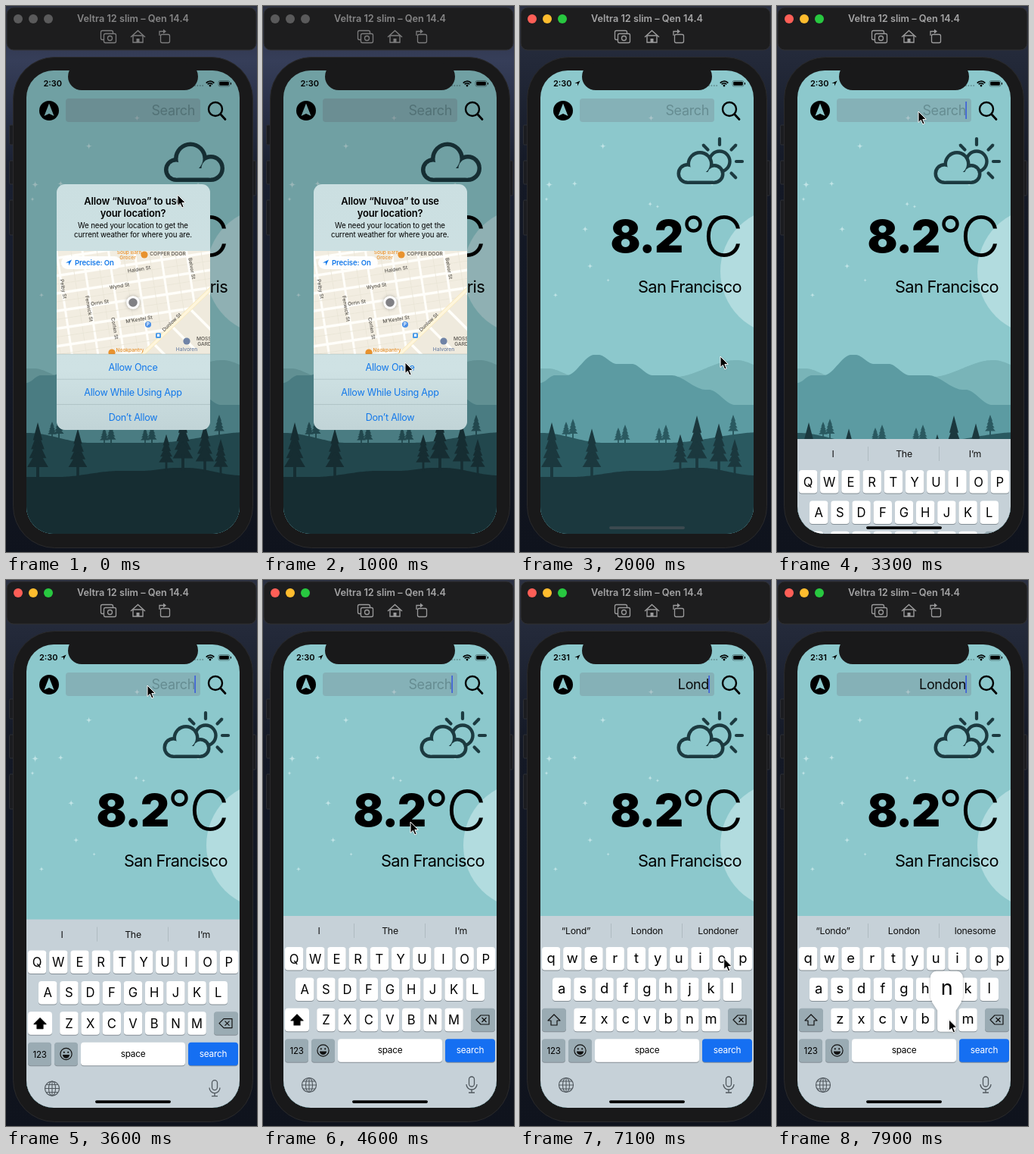
These frames come from a looping animation (332x720 px, 8 s). An HTML page with a canvas:

```html
<!DOCTYPE html>
<html lang="en">
<head>
<meta charset="utf-8">
<title>Weather app demo</title>
<style>
html, body { margin: 0; width: 100%; height: 100%; overflow: hidden; background: #151a28; }
canvas { display: block; width: 332px; height: 720px; }
</style>
</head>
<body>
<canvas id="stage"></canvas>
<script>
const W = 332, H = 720, LOOP = 8000, STEP = 100;
const canvas = document.getElementById('stage');
const scale = window.devicePixelRatio || 1;
canvas.width = W * scale;
canvas.height = H * scale;
const c = canvas.getContext('2d');

const SKY = '#8cc8cc', INK = '#1c3a40', BLUE = '#1278ea';
const BODY = '#19191a', BAR = '#1d1d1e', DARK_KEY = '#9aabb3';
const screen = { x: 27, y: 85, w: 282, h: 611 };

// ---------- helpers ----------
const ramp = (t, a, b) => Math.max(0, Math.min(1, (t - a) / (b - a)));
const mix = (a, b, k) => a + (b - a) * k;
const easeOut = k => 1 - (1 - k) ** 2;
const smooth = (x, a, b) => { const k = ramp(x, a, b); return k * k * (3 - 2 * k); };

function paint(fill, stroke, width = 1) {
  if (fill) { c.fillStyle = fill; c.fill(); }
  if (stroke) { c.strokeStyle = stroke; c.lineWidth = width; c.stroke(); }
}
function box(x, y, w, h, r, ...style) {
  c.beginPath();
  c.roundRect(x, y, w, h, r);
  paint(...style);
}
function disc(x, y, r, ...style) {
  c.beginPath();
  c.arc(x, y, r, 0, Math.PI * 2);
  paint(...style);
}
function arc(x, y, r, from, to, ...style) {
  c.beginPath();
  c.arc(x, y, r, from * Math.PI, to * Math.PI);
  paint(...style);
}
function poly(points, ...style) {
  c.beginPath();
  points.forEach(p => c.lineTo(...p));
  c.closePath();
  paint(...style);
}
function line(color, width, ...points) {
  c.beginPath();
  points.forEach(p => c.lineTo(...p));
  paint(null, color, width);
}
function text(str, x, y, size, { weight = 400, color = '#000', align = 'center', tight = 0.02 } = {}) {
  c.font = `${weight} ${size}px Inter, "Open Sans", sans-serif`;
  c.letterSpacing = -tight * size + 'px';
  c.textAlign = align;
  c.fillStyle = color;
  c.fillText(str, x, y);
}
function shadow(blur, paintShape) {
  c.save();
  c.shadowColor = 'rgba(0,0,0,.3)';
  c.shadowBlur = blur;
  paintShape();
  c.restore();
}
function arrowhead(x, y, s, fill) {
  poly([[x + s, y - s], [x, y + s], [x, y], [x - s, y]], fill);
}

// ---------- keys, typing and pointer ----------
const rows = ['qwertyuiop', 'asdfghjkl', 'zxcvbnm'];
const PITCH = 28.2, WORD = 'London', KEYBOARD_AT = 3300;
const keyX = (row, i) => 168 + (i - (rows[row].length - 1) / 2) * PITCH;
const keyY = row => 484 + row * 40.4;

const presses = [...WORD].map((letter, i) => {
  const low = letter.toLowerCase(), row = rows.findIndex(r => r.includes(low));
  return { letter, time: 4940 + 502 * i + 14 * i * i, x: keyX(row, rows[row].indexOf(low)), y: keyY(row) };
});
const pressedBy = t => presses.filter(p => t >= p.time).length;
const typedBy = t => WORD.slice(0, pressedBy(t - 100));

const stops = [
  { from: 0, to: 900, x: 188, y: 470 },
  { from: 1400, to: 2000, x: 265, y: 462 },
  { from: 2200, to: 3000, x: 187, y: 139 },
  { from: 4000, to: 4600, x: 195, y: 319 },
  ...presses.map((p, i) => ({
    from: i ? presses[i - 1].time + 60 : 4600, to: p.time - 110, x: p.x + 3, y: p.y + 15
  }))
];
function pointerAt(t) {
  return stops.reduce((at, s) => {
    const k = easeOut(ramp(t, s.from, s.to));
    return { x: mix(at.x, s.x, k), y: mix(at.y, s.y, k) };
  }, { x: 227, y: 249 });
}

// ---------- desktop and device ----------
function desktop(active) {
  const g = c.createLinearGradient(0, 0, 0, H);
  g.addColorStop(0, '#2b3042');
  g.addColorStop(0.1, active ? '#232939' : '#363e59');
  g.addColorStop(0.3, active ? '#141926' : '#1a2031');
  g.addColorStop(1, '#0f131d');
  c.fillStyle = g;
  c.fillRect(0, 0, W, H);
}
function toolbar(active) {
  box(1, 2, 330, 56, 9, BAR, '#303032');
  ['#fe5f57', '#febc2e', '#28c840'].forEach((color, i) => disc(16 + i * 20, 17, 6, active ? color : '#5a5a5b'));
  text('Veltra 12 slim – Qen 14.4', 168, 21, 12.7, { weight: 600, color: active ? '#a5a5a6' : '#858586', tight: 0 });

  const grey = active ? '#9b9b9c' : '#7c7c7d';
  box(125.5, 32.5, 16, 12, 2, null, grey, 1.3);
  box(129.5, 36.5, 16, 12, 2, BAR, grey, 1.3);
  disc(137.5, 42.5, 3, null, grey, 1.3);
  line(grey, 1.4, [165, 41], [174.5, 32.5], [184, 41]);
  box(168, 39, 13, 9, 0, null, grey, 1.4);
  box(172.5, 43, 4, 5, 0, grey);
  box(204.5, 37.5, 12, 11, 2, null, grey, 1.3);
  line(grey, 1.3, [203, 39], [203, 33.5], [210, 33.5]);
  poly([[208, 30.5], [212, 33.5], [208, 36.5]], grey);
}
function device() {
  const side = (x, y, h) => box(x, y, 6, h, 1.5, '#1b1c20', '#2d2f35');
  side(4.5, 157, 26);
  side(4.5, 204, 31);
  side(4.5, 256, 46);
  side(324.5, 204, 46);
  box(9.5, 67.5, 317, 647, 55, BODY, '#2a2a2c');
}

// ---------- landscape ----------
function ridge(height, color) {
  c.beginPath();
  c.moveTo(screen.x, H);
  for (let x = screen.x; x <= screen.x + screen.w; x += 2) c.lineTo(x, height(x));
  c.lineTo(screen.x + screen.w, H);
  paint(color);
}
const farHills = x => 478 + 11 * smooth(x, 38, 75) - 22 * smooth(x, 205, 285) + 10 * smooth(x, 288, 325);
const mountain = x => 497 - 10 * smooth(x, 27, 46) - 27 * smooth(x, 62, 98) + 12 * smooth(x, 104, 128)
  + 15 * smooth(x, 148, 175) + 19 * smooth(x, 200, 246) + 20 * smooth(x, 250, 284);
const meadow = x => 563 + 13 * smooth(x, 30, 110) - 14 * smooth(x, 195, 320);
const ground = x => 621 - 8 * smooth(x, 70, 150) - 4 * smooth(x, 180, 225) + 10 * smooth(x, 240, 310);

function tree(x, height, base, color) {
  const w = 6 + height * 0.31, crown = height * 0.82;
  for (let i = 0; i < 4; i++) {
    const y = base - height + crown * i * 0.2, half = w * (0.22 + 0.09 * i);
    poly([[x, y], [x + half, y + crown * 0.4], [x - half, y + crown * 0.4]], color);
  }
  c.fillRect(x - w * 0.07, base - height * 0.25, w * 0.14, height * 0.25 + 4);
}
function stars() {
  let seed = 11;
  const random = () => (seed = seed * 16807 % 2147483647) / 2147483647;
  for (let i = 0; i < 12; i++) {
    const x = mix(35, 300, random()), y = mix(118, 424, random()), r = mix(2, 5.5, random());
    c.beginPath();
    c.moveTo(x, y - r);
    [[r, 0], [0, r], [-r, 0], [0, -r]].forEach(([dx, dy]) => c.quadraticCurveTo(x, y, x + dx, y + dy));
    paint('#bfe3e5');
  }
}
function landscape() {
  c.fillStyle = SKY;
  c.fillRect(screen.x, screen.y, screen.w, screen.h);
  disc(349, 350, 84, '#b2dcdf');
  stars();
  ridge(farHills, '#79b4b8');
  ridge(mountain, '#5c9ba2');

  const mid = '#2a5960', near = '#1b383e';
  ridge(meadow, mid);
  for (const x of [65, 134, 188]) {
    tree(x - 4, 20, meadow(x), mid);
    tree(x + 5, 24, meadow(x), mid);
  }
  tree(282, 26, meadow(282), mid);
  ridge(ground, near);
  const groves = { 42: 72, 95: 62, 212: 45, 234: 69, 263: 61, 284: 45 };
  for (const x in groves) tree(+x, groves[x], ground(+x), near);
}

// ---------- weather screen ----------
function cloud(lobes, bottom, width) {
  const left = lobes[0], right = lobes[2];
  for (const [inset, color] of [[0, INK], [width, SKY]]) {
    lobes.forEach(([x, y, r]) => disc(x, y, r - inset, color));
    c.fillRect(left[0], left[1] - 2, right[0] - left[0], bottom - inset - left[1] + 2);
  }
}
function sunnyCloud() {
  c.lineCap = 'round';
  for (let i = -3; i <= 1; i++) {
    const dx = Math.cos(i * Math.PI / 4), dy = Math.sin(i * Math.PI / 4);
    line(INK, 4.2, [264 + dx * 22, 205 + dy * 22], [264 + dx * 30, 205 + dy * 30]);
  }
  c.lineCap = 'butt';
  disc(264, 205, 13.5, null, INK, 4.4);
  cloud([[221.5, 221, 14], [238, 208.5, 17.5], [257, 221.5, 13.5]], 235, 4.5);
}
function statusBar(t) {
  const located = t >= 1300;
  text(t >= 7000 ? '2:31' : '2:30', located ? 44 : 49.5, 106, 11, { weight: 600, align: 'left', tight: 0 });
  if (located) arrowhead(76, 102, 3.6, '#000');
  for (let i = 0; i < 4; i++) disc(250 + i * 3.4, 105, 1, 'rgba(0,0,0,.28)');
  for (const r of [4.1, 6.8]) arc(270, 106, r, 1.22, 1.78, null, '#000', 1.7);
  disc(270, 105, 1.4, '#000');
  box(281, 98.5, 15, 7.5, 2.2, null, 'rgba(0,0,0,.45)', 0.8);
  box(282.2, 99.7, 12.6, 5.1, 1.2, '#000');
  c.fillRect(297, 101, 1, 2.6);
}
function searchRow(t) {
  disc(57, 138, 13, '#000');
  poly([[57, 128.5], [63.5, 145], [57, 142], [50.5, 145]], SKY);
  box(79, 122, 178, 31, 4, 'rgba(116,116,128,.28)');
  const word = typedBy(t);
  text(word || 'Search', 250, 144, 18, { align: 'right', color: word ? '#0a0c0c' : '#668d92' });
  const lastEdit = word ? presses[word.length - 1].time : KEYBOARD_AT;
  if (t >= KEYBOARD_AT && (t - lastEdit) % 1000 < 600) box(249.3, 126, 1.7, 23, 0, '#3f62d8');
  disc(277, 136, 9, null, '#000', 2.4);
  c.lineCap = 'round';
  line('#000', 2.8, [283.8, 142.8], [290, 149.5]);
  c.lineCap = 'butt';
}
function weather(t) {
  const updated = t >= 1600;
  if (updated) sunnyCloud();
  else cloud([[225, 216, 16], [244, 201.5, 22], [271, 214, 18]], 232, 5.5);
  text(updated ? '8.2' : '9.4', 215, 325, 59, { weight: 900, align: 'right' });
  disc(229.5, 287.5, 9, null, '#000', 4.4);
  text('C', 294, 330, 73, { weight: 300, align: 'right' });
  text(updated ? 'San Francisco' : 'Paris', 293, 377.5, 21.8, { align: 'right', tight: 0.03 });
}

// ---------- permission dialog ----------
function label(str, x, y, degrees = 0, color = '#55524c') {
  c.save();
  c.translate(x, y);
  c.rotate(degrees * Math.PI / 180);
  text(str, 0, 2.4, 6.6, { weight: 500, color, tight: 0 });
  c.restore();
}
function place(name, x, y, color) {
  disc(x, y, 4.6, color);
  label(name, x, y + 11, 0, color);
}
function streets() {
  c.save();
  c.translate(168, 391);
  c.rotate(-0.15);
  for (let i = -5; i <= 5; i++) {
    line('#e9e4d5', 0.7, [-140, i * 23 + 7], [140, i * 23 + 7]);
    line('#fffefa', 3.4, [-140, i * 23 - 4], [140, i * 23 - 4]);
    line('#fffefa', 3, [i * 34 + 12, -110], [i * 34 + 12, 110]);
    line('#e9e4d5', 0.7, [i * 34 - 3, -110], [i * 34 - 3, 110]);
  }
  c.restore();
  poly([[181, 460], [271, 373], [271, 460]], '#efeadd');
  for (let i = 0; i < 4; i++) line('#fffefa', 3.4, [195 + i * 24, 445 - i * 23], [225 + i * 24, 475 - i * 23]);
  line('#f7e9bf', 5, [176, 464], [274, 370]);
  line('#fff6dc', 3.4, [176, 464], [274, 370]);
}
function cityMap() {
  c.save();
  c.beginPath();
  c.rect(67, 323, 203, 136);
  c.clip();
  c.fillStyle = '#f2ede1';
  c.fillRect(67, 323, 203, 136);
  streets();
  ['Halden St', 'Wynd St', 'Orrin St', 'M’Kestel St'].forEach((name, i) => label(name, 176 - 26 * (i % 3), 347 + 22 * i, -9));
  ['Pelby St', 'Fenwick St', 'Corlen St'].forEach((name, i) => label(name, 76 + 34 * i, 373 + 26 * i, 80));
  label('Belvor St', 246, 346, 80);
  label('Dunlow St', 219, 417, -44);
  label('COPPER DOOR', 214, 327);
  label('MOSSY', 264, 439);
  label('GARDEN', 267, 446);

  const orange = '#e8922e';
  label('Soup Barn', 163, 325, 0, orange);
  label('Grocer', 161, 332, 0, orange);
  label('Nookpantry', 164, 454, 0, orange);
  disc(183, 328, 4.6, orange);
  disc(140, 457, 4.6, orange);
  place('Halvoren', 239, 442, '#6f83a6');
  disc(188, 420, 4, '#4b8fe6');
  text('P', 188, 422.4, 6, { weight: 700, color: '#fff' });
  box(198, 431, 7, 7, 1.5, '#4b9be8');
  box(200, 432.5, 3, 3.5, 0.5, '#fff');

  shadow(4, () => disc(168, 391, 8.8, '#fff'));
  disc(168, 391, 5.8, '#808084');
  box(73, 330, 79, 17, 8.5, 'rgba(255,255,255,.94)');
  arrowhead(83, 338.5, 4, BLUE);
  text('Precise: On', 91, 342, 9.5, { weight: 600, color: BLUE, align: 'left', tight: 0.01 });
  c.restore();
}
function dialog(t) {
  const alpha = 1 - ramp(t, 1150, 1420);
  if (!alpha) return;
  c.save();
  c.globalAlpha = alpha;
  c.fillStyle = 'rgba(0,0,0,.2)';
  c.fillRect(screen.x, screen.y, screen.w, screen.h);
  const g = c.createLinearGradient(0, 235, 0, 559);
  g.addColorStop(0, '#cbdfe1');
  g.addColorStop(0.75, '#cfe2e4');
  g.addColorStop(1, '#c1d4d7');
  box(67, 235, 203, 324, 11, g);
  const bold = { weight: 600, tight: 0.01 }, plain = { tight: 0.01 };
  text('Allow “Nuvoa” to use', 168, 262, 12.9, bold);
  text('your location?', 168, 278, 12.9, bold);
  text('We need your location to get the', 168, 293, 9.7, plain);
  text('current weather for where you are.', 168, 305, 9.7, plain);
  cityMap();
  if (t >= 1100) box(67, 459, 203, 33, 0, 'rgba(0,0,0,.08)');
  ['Allow Once', 'Allow While Using App', 'Don’t Allow'].forEach((name, i) => {
    const y = 459 + i * 33.2;
    line('rgba(60,80,90,.25)', 0.7, [67, y], [270, y]);
    text(name, 168, y + 21.5, 12.6, { color: BLUE });
  });
  c.restore();
}

// ---------- keyboard ----------
function key(x, y, w, fill = '#fff') {
  box(x, y + 1, w, 30.5, 4, '#858f96');
  box(x, y, w, 30.5, 4, fill);
}
function popup({ letter, x, y }) {
  shadow(3, () => {
    c.beginPath();
    c.roundRect(x - 21.5, y - 49, 43, 42, 8);
    c.roundRect(x - 12.2, y - 10, 24.4, 41, 4);
    c.moveTo(x - 20, y - 9);
    [[20, -9], [12.2, 3], [-12.2, 3]].forEach(([dx, dy]) => c.lineTo(x + dx, y + dy));
    paint('#fff');
  });
  text(letter, x, y - 18, 27);
}
function suggestions(t) {
  const count = Math.max(0, pressedBy(t - 190)), word = WORD.slice(0, count);
  const guesses = ['The', 'Let', 'Look'], others = ['I’m', 'Love', 'Love', 'longer', 'Londoner', 'lonesome', 'Londoners'];
  let ink = '#111';
  if (count === 3 && t < 6300) {
    ink = c.createLinearGradient(144, 0, 166, 0);
    ink.addColorStop(0, 'rgba(17,17,17,.1)');
    ink.addColorStop(1, '#111');
  }
  [word ? `“${word}”` : 'I', guesses[count] || WORD, others[count]].forEach((str, i) => {
    if (i) line('#aab5bc', 0.8, [26.5 + i * 94, 453], [26.5 + i * 94, 472]);
    text(str, 74 + i * 94, 467, 12.3, { color: i === 1 ? ink : '#111' });
  });
}
function keyIcons(upper) {
  const ink = '#111', grey = '#50585e';
  c.lineJoin = 'round';
  poly([[45, 573], [53, 581], [49, 581], [49, 587], [41, 587], [41, 581], [37, 581]], upper ? '#000' : null, ink, 1.2);
  poly([[282, 580], [288, 574], [299, 574], [299, 586], [288, 586]], null, ink, 1.2);
  for (const d of [-3, 3]) line(ink, 1.2, [292.5 - d, 577], [292.5 + d, 583]);

  disc(79.5, 620.5, 7.6, null, ink, 1.2);
  for (const d of [-2.7, 2.7]) disc(79.5 + d, 618.3, 1.1, ink);
  arc(79.5, 621.5, 4.6, 0, 1, ink);

  disc(61, 666, 9.5, null, grey, 1.2);
  c.beginPath();
  c.ellipse(61, 666, 4.5, 9.5, 0, 0, Math.PI * 2);
  paint(null, grey, 1.1);
  line(grey, 1.1, [61, 656.5], [61, 675.5]);
  for (const d of [-5, 0, 5]) {
    const half = Math.sqrt(90 - d * d);
    line(grey, 1.1, [61 - half, 666 + d], [61 + half, 666 + d]);
  }
  box(272.5, 655, 7, 13, 3.5, null, grey, 1.3);
  arc(276, 665, 7, 0, 1, null, grey, 1.3);
  line(grey, 1.3, [276, 672], [276, 676]);
  line(grey, 1.3, [272, 676], [280, 676]);
}
function keyboard(t) {
  if (t < KEYBOARD_AT) return;
  const upper = !typedBy(t);
  c.save();
  c.translate(0, 128 * Math.exp((KEYBOARD_AT - t) / 90));
  c.fillStyle = '#c6d1d8';
  c.fillRect(screen.x, 443, screen.w, 260);
  suggestions(t);
  rows.forEach((row, r) => [...row].forEach((letter, i) => {
    const x = keyX(r, i), y = keyY(r);
    key(x - 12.2, y, 24.4);
    text(upper ? letter.toUpperCase() : letter, x, y + (upper ? 21.5 : 20.5), upper ? 16.6 : 18.4, { tight: 0 });
  }));
  key(29, keyY(2), 32, upper ? '#fff' : DARK_KEY);
  key(275, keyY(2), 32, DARK_KEY);
  key(29, keyY(3), 31, DARK_KEY);
  key(64, keyY(3), 31, DARK_KEY);
  key(99, keyY(3), 138);
  key(241, keyY(3), 66, '#156ff2');
  text('123', 44.5, 625, 11.5);
  text('space', 168, 624, 11.8);
  text('search', 274, 624, 11.8, { color: '#fff' });
  keyIcons(upper);
  const held = presses.find(p => t >= p.time && t < p.time + 180);
  if (held) popup(held);
  c.restore();
}

function pointer(t) {
  const { x, y } = pointerAt(t);
  const shape = [[0, 0], [0, 14.5], [3.4, 11.4], [5.8, 17], [8.2, 16], [5.8, 10.5], [10.3, 10.3]];
  c.save();
  c.translate(x, y);
  c.lineJoin = 'round';
  shadow(2, () => poly(shape, '#000'));
  poly(shape, null, '#fff');
  c.restore();
}

function draw(t) {
  const active = t >= 1100;
  c.setTransform(scale, 0, 0, scale, 0, 0);
  desktop(active);
  toolbar(active);
  device();
  c.save();
  c.beginPath();
  c.roundRect(screen.x, screen.y, screen.w, screen.h, 36);
  c.clip();
  landscape();
  statusBar(t);
  searchRow(t);
  weather(t);
  dialog(t);
  keyboard(t);
  if (t >= 1400) box(118, 686.3, 100, 3.6, 1.8, t >= KEYBOARD_AT ? '#000' : '#3c4a50');
  c.restore();
  box(82, 75, 172, 36, 18, BODY);
  pointer(t);
}

function frame() {
  const t = performance.now() % LOOP;
  draw(Math.floor(t / STEP) * STEP);
  requestAnimationFrame(frame);
}
frame();
</script>
</body>
</html>
```
